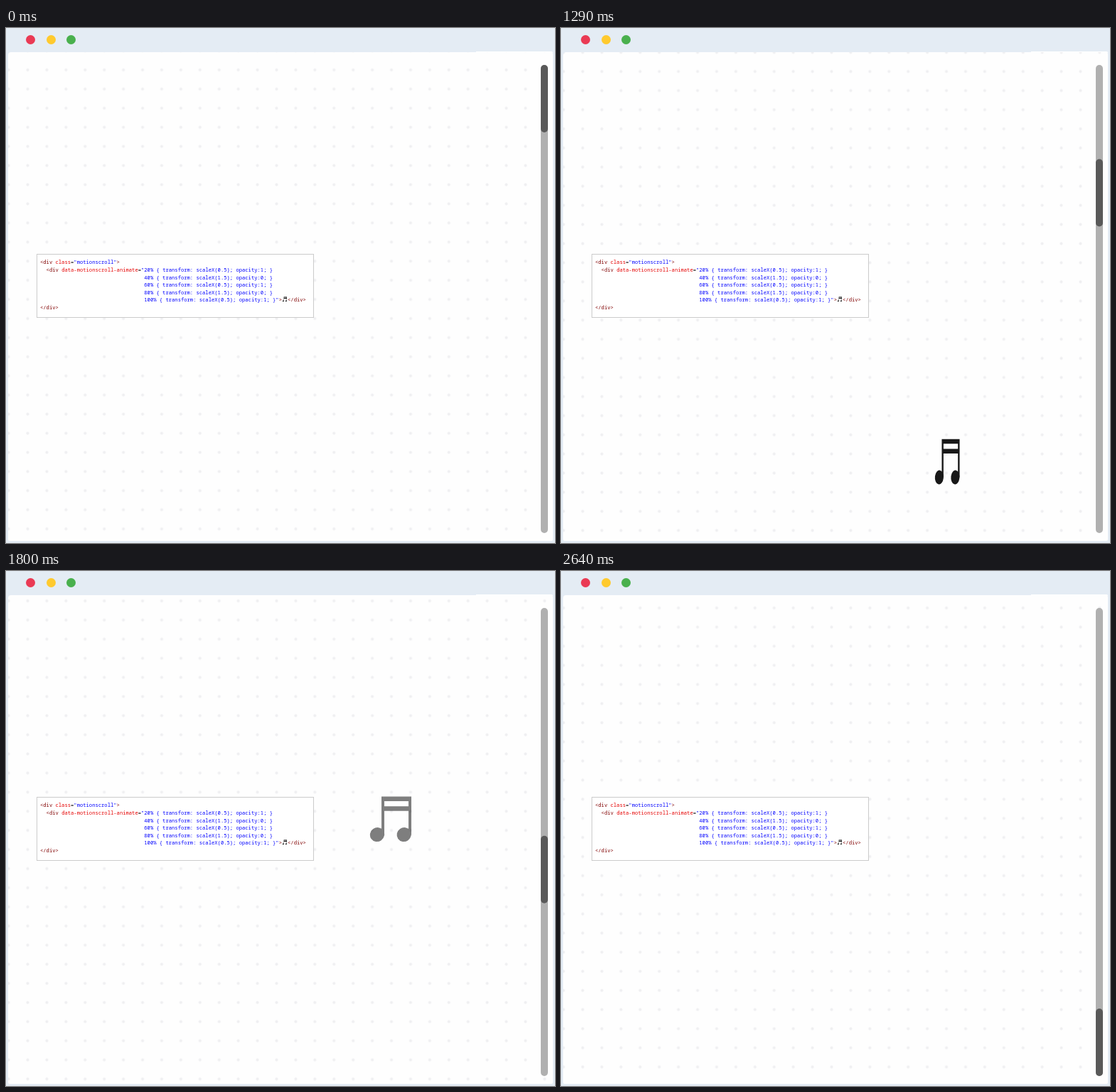
These frames come from a looping animation (772x725 px, 2.91 s). An HTML page:

```html
<!DOCTYPE html>
<html lang="en">
<head>
<meta charset="utf-8">
<title>Scroll animation</title>
<style>
  html, body { margin: 0; width: 100%; height: 100%; overflow: hidden; }
  body { position: relative; background: #e4ecf4; }
  body div, pre, svg { position: absolute; }
  .light { top: 10px; width: 13px; height: 13px; border-radius: 50%; }
  .edge { left: 661px; top: 33px; width: 108px; height: 2px; background: #fff; border-radius: 0 3px 0 0; }
  #page {
    left: 3px; top: 34px; width: 766px; height: 688px;
    overflow: hidden; border-radius: 4px 3px 2px 2px;
    background: #fefefe radial-gradient(circle, #efeff1 1.2px, #efeff100 2.7px) 14.04px 11.54px / 26.93px 26.93px;
  }
  #note { left: 0; top: 0; width: 766px; height: 688px; }
  #code {
    left: 43px; top: 318px; width: 390px; height: 90px; box-sizing: border-box;
    border: 1px solid #cbcbcb; background: #fff;
  }
  pre {
    left: 4px; top: 5.3px; margin: 0; color: #800000;
    font: 7.18px/10.62px "Noto Sans Mono", monospace;
  }
  pre i { font-style: normal; color: #e50000; }
  pre b { font-weight: normal; color: #00f; }
  pre u { text-decoration: none; color: #000; }
  pre .tune { font: 9px/0 "DejaVu Sans", sans-serif; }
  #track, #thumb { left: 752px; top: 52px; width: 10px; border-radius: 5px; }
  #track { height: 659px; background: #b0b0b0; }
  #thumb { height: 95px; background: #595959; }
</style>
</head>
<body>
<div class="light" style="left:28px;background:#ea3a54"></div>
<div class="light" style="left:56.5px;background:#ffca2e"></div>
<div class="light" style="left:85px;background:#49b04d"></div>
<div class="edge"></div>
<div id="page">
  <svg id="note">
    <g id="glyph">
      <path d="M-18.5 0H23.5V54H19.5V20.3H-14.5V54H-18.5ZM-14.5 6.5V13.8H19.5V6.5Z" fill-rule="evenodd"/>
      <ellipse cx="-24.5" cy="53.7" rx="10.3" ry="9.8" transform="rotate(-35 -24.5 53.7)"/>
      <ellipse cx="13.2" cy="53.7" rx="10.3" ry="9.8" transform="rotate(-35 13.2 53.7)"/>
    </g>
  </svg>
</div>
<div id="code"><pre>&lt;div <i>class</i><u>=</u><b>"motionscroll"</b>&gt;
  &lt;div <i>data-motionscroll-animate</i><u>=</u><b>"20% { transform: scaleX(0.5); opacity:1; }
                                  40% { transform: scaleX(1.5); opacity:0; }
                                  60% { transform: scaleX(0.5); opacity:1; }
                                  80% { transform: scaleX(1.5); opacity:0; }
                                  100% { transform: scaleX(0.5); opacity:1; }"</b>&gt;<u class="tune">♬</u>&lt;/div&gt;
&lt;/div&gt;</pre></div>
<div id="track"></div>
<div id="thumb"></div>
<script>
  const LOOP = 2910, STEP = 30;
  const page = document.getElementById('page');
  const glyph = document.getElementById('glyph');
  const thumb = document.getElementById('thumb');

  // [time, value] pairs, linear in between
  const scroll = [[840, 0], [870, 12.5], [1290, 213.2], [1500, 312.7], [1800, 474.6], [2040, 648.8], [2460, 895.4]];
  const progress = [[840, 0], [1290, .2195], [1500, .33], [1800, .5], [2040, .669], [2460, .93]];
  const bar = [[931, 0], [2459, 564]];
  const scale = [[0, 1], [.2, .5], [.4, 1.5], [.6, .5], [.8, 1.5], [1, .5]];
  const opacity = [[0, 1], [.2, 1], [.4, 0], [.6, 1], [.8, 0], [1, 1]];

  function at(keys, x) {
    if (x <= keys[0][0]) return keys[0][1];
    for (let i = 1; i < keys.length; i++) {
      const [x0, y0] = keys[i - 1], [x1, y1] = keys[i];
      if (x <= x1) return y0 + (y1 - y0) * (x - x0) / (x1 - x0);
    }
    return keys[keys.length - 1][1];
  }

  function draw(ms) {
    const t = Math.floor((ms % LOOP) / STEP) * STEP;
    const y = at(scroll, t), p = at(progress, t);
    page.style.backgroundPositionY = 11.54 - y + 'px';
    glyph.setAttribute('transform', `translate(543.5 ${758 - y}) scale(${at(scale, p)} 1)`);
    glyph.setAttribute('opacity', at(opacity, p));
    thumb.style.transform = `translateY(${at(bar, t)}px)`;
  }

  let start;
  function tick(now) {
    start ??= now;
    draw(now - start);
    requestAnimationFrame(tick);
  }
  draw(0);
  requestAnimationFrame(tick);
</script>
</body>
</html>
```
